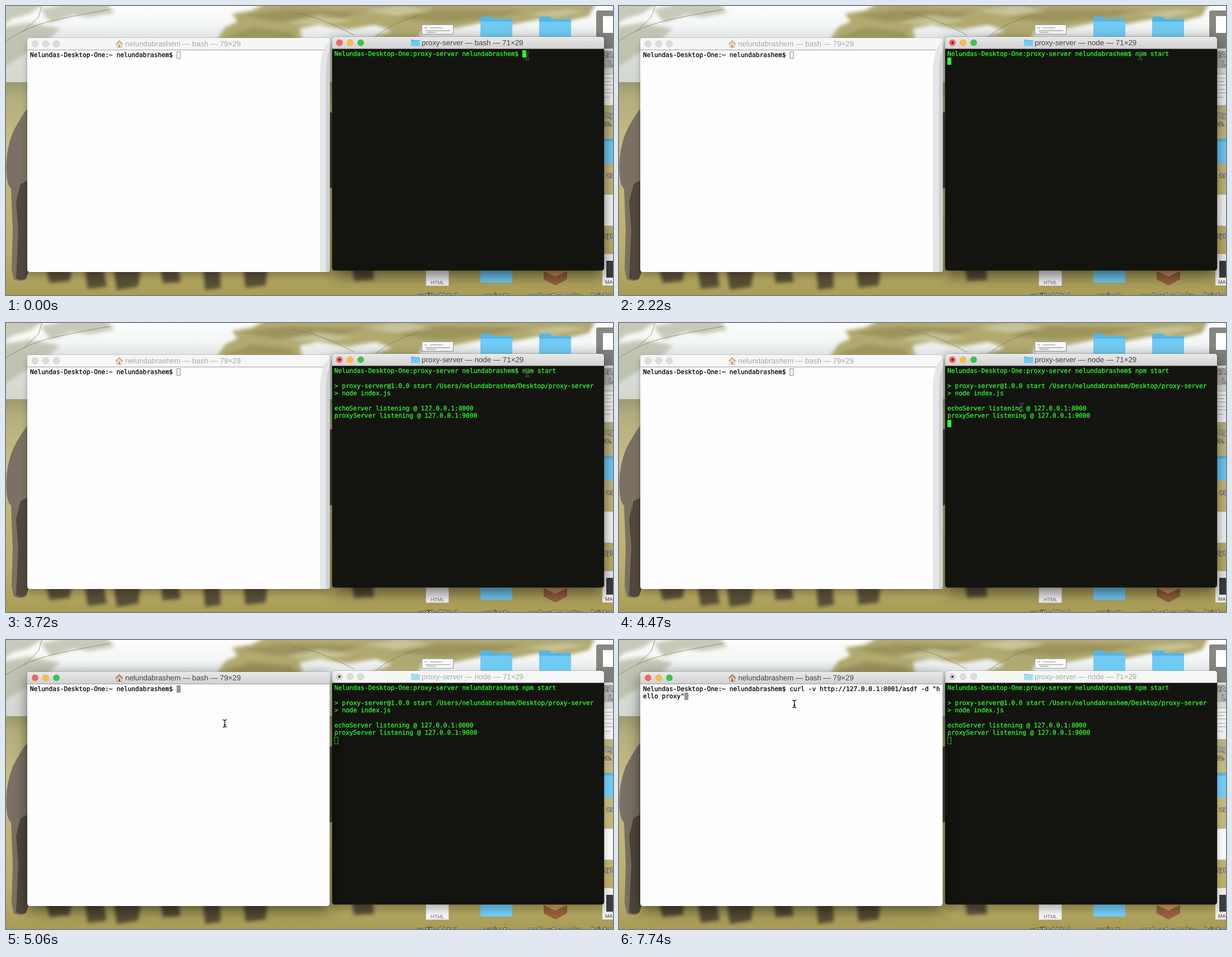
Animation of 1085 by 516 pixels, one loop 8 s. Source, as an HTML page:

```html
<!DOCTYPE html>
<html lang="en">
<head>
<meta charset="utf-8">
<title>Proxy server demo</title>
<style>
html, body { margin: 0; width: 100%; height: 100%; overflow: hidden; background: #fff; }
svg { display: block; width: 1085px; height: 516px; }
text { white-space: pre; text-rendering: geometricPrecision; }
.term text { font: 11.16px "DejaVu Sans Mono", monospace; stroke-width: .3; }
.left .term text { fill: #000; stroke: #000; }
.right .term text { fill: #2cfb2c; stroke: #2cfb2c; }
.title { font: 13.3px "Liberation Sans", sans-serif; fill: #a8a8a8; }
.active .title { fill: #454545; }
.label { font: 13px "Liberation Sans", sans-serif; fill: #fff; stroke: #0008; stroke-width: 2; paint-order: stroke; text-anchor: middle; }
.edge { text-anchor: start; font-size: 12px; }
.shadow { opacity: .22; filter: url(#near); }
.active .shadow { opacity: .52; filter: url(#far); }
.cast { display: none; }
.active .cast { display: inline; }
.bar { fill: #f6f6f6; }
.active .bar { fill: url(#barFill); }
.dot { fill: #dcdcdc; stroke: #c6c6c6; stroke-width: .7; }
.active .dot { stroke: #0002; }
.active .close { fill: #fc605b; }
.active .mini { fill: #fdbc40; }
.active .zoom { fill: #34c749; }
.icon { opacity: .6; }
.active .icon { opacity: 1; }
.left .caret { fill: none; stroke: #888; }
.left.active .caret { fill: #979797; stroke: #8a8a8a; }
.right .caret { fill: none; stroke: #24c424; }
.right.active .caret { fill: #2cfb2c; stroke: #2cfb2c; }
.hidden { display: none; }
</style>
</head>
<body>
<svg viewBox="0 0 1085 516">
  <defs>
    <linearGradient id="barFill" x2="0" y2="1">
      <stop stop-color="#e9e9e9"/><stop offset="1" stop-color="#d1d1d1"/>
    </linearGradient>
    <linearGradient id="sky" x2="0" y2="1">
      <stop stop-color="#fcfdfc"/><stop offset=".25" stop-color="#f4f6f6"/>
      <stop offset=".4" stop-color="#dfe4e4"/><stop offset="1" stop-color="#d2d6cb"/>
    </linearGradient>
    <linearGradient id="land" x2="0" y2="1">
      <stop stop-color="#9a9b70"/><stop offset=".08" stop-color="#b4ae7e"/>
      <stop offset=".3" stop-color="#c8bd82"/><stop offset=".8" stop-color="#bbae68"/>
      <stop offset="1" stop-color="#a89c56"/>
    </linearGradient>
    <filter id="near" x="-10%" y="-10%" width="120%" height="120%"><feGaussianBlur stdDeviation="6"/></filter>
    <filter id="far" x="-15%" y="-15%" width="130%" height="130%"><feGaussianBlur stdDeviation="12"/></filter>
    <filter id="soft"><feGaussianBlur stdDeviation="3"/></filter>
    <clipPath id="outsideLeft">
      <path clip-rule="evenodd" d="M0 0H1085V516H0zM38 57H578.500V475H38z"/>
    </clipPath>
    <g id="folder">
      <path fill="#55b5e5" d="M0 3q0-3 3-3h16l4 4h31q3 0 3 3v20H0z"/>
      <path fill="#70caf4" d="M0 9h57v36q0 3-3 3H3q-3 0-3-3z"/>
    </g>
    <path id="beam" fill="none" d="M-3.5-6.5q3.5 0 3.5 2v9q0 2-3.5 2M3.5-6.5q-3.5 0-3.5 2M3.5 6.5q-3.5 0-3.5-2M-2 2.5h4"/>
  </defs>

  <!-- landscape -->
  <rect width="1085" height="140" fill="url(#sky)"/>
  <g filter="url(#soft)">
    <path fill="#b0a970" d="M376 62L392 38 414 28 404 14 440 8 470-8H1056L1042 18 1000 28 950 24 900 34 850 30 800 40 745 42 735 62H640L690 44 660 34 610 42 560 34 525 40 530 62z"/>
    <path fill="#8f8850" opacity=".6" d="M420 16L500 6 640 10 590 24 480 28zM690 22L770 6 930 8 880 20 780 30zM385 58L440 38 510 46 520 60z"/>
    <path fill="#d8d6b4" opacity=".6" d="M500 30L560 16 620 26 560 34zM640 8L710-2 760 8 700 18zM930 14L1000 6 1040 10 980 20z"/>
    <path fill="#b3b59d" opacity=".7" d="M-5-5H70L42 14 12 22-5 34zM62 6L110-5 180-5 194 12 150 20 120 16 80 30zM-5 38L40 30 96 40 76 60-5 110z"/>
  </g>
  <path fill="none" stroke="#77755a" opacity=".7" d="M0 62Q40 36 84 26T186 6M30 46L58 20 64 0M512 12Q560 18 622 52M660 55Q690 30 740 16"/>
  <rect y="136" width="1085" height="380" fill="url(#land)"/>
  <path fill="#7a7164" d="M42 178Q26 198 12 226Q-2 262 1 300Q2 320 9 326L12 400 10 470 14 488Q26 494 36 488L42 470z"/>
  <path fill="#50483b" d="M42 310L26 318 18 350 22 400 18 486Q28 492 36 486L42 470z"/>
  <path fill="#574e35" filter="url(#soft)" d="M70 465h48l-4 26-36 4zM140 465h34l6 36-34 4zM192 465h50l-6 36-38 6zM276 465h32l4 28-32 2zM352 465h30l2 38-28 4zM424 465h44l-4 34-36 4zM618 465h38l2 24-36 2z"/>
  <path fill="#4e4734" d="M570 190h18v132l-18 8z"/>

  <!-- desktop items -->
  <rect x="743.5" y="33.5" width="56" height="17" fill="#fafafa" stroke="#9a9a9a"/>
  <path stroke="#888" d="M748 39h5M758 39h22M750 44h44M752 47h16"/>
  <use href="#folder" x="848" y="19"/>
  <use href="#folder" x="953" y="19"/>
  <use href="#folder" x="848" y="446"/>
  <use href="#folder" x="1045" y="233"/>
  <rect x="1055" y="8" width="40" height="68" rx="3" fill="#4c4a42" opacity=".65"/>
  <rect x="1067" y="18" width="30" height="30" fill="#fff"/>
  <rect x="1066" y="80" width="30" height="31" fill="#b5b4ac"/>
  <rect x="1062" y="121.5" width="40" height="56" fill="#f0f0ee" stroke="#aaa"/>
  <path stroke="#999" d="M1070 129h15M1070 135h12M1070 141h15M1070 149h13M1070 155h15M1070 163h10"/>
  <rect x="1062" y="336.5" width="40" height="56" fill="#f7f7f6" stroke="#bbb"/>
  <rect x="1066" y="443" width="40" height="56" fill="#ececea"/>
  <rect x="1073" y="455" width="30" height="30" fill="#3c3c3c"/>
  <text x="1071" y="496" font-family="Liberation Sans, sans-serif" font-size="9" fill="#444">MA</text>
  <rect x="750.5" y="446" width="41" height="53.5" fill="#f3f3f3" stroke="#bbb"/>
  <text x="759" y="496.5" font-family="Liberation Sans, sans-serif" font-size="9" fill="#777">HTML</text>
  <path fill="#94613a" d="M961 473l21 10 21-10v15l-21 11-21-11z"/>
  <path fill="#c8945f" d="M961 473l21-9 21 9-21 10z"/>
  <g class="label">
    <text x="771" y="522">untitled.html</text>
    <text x="877" y="522">projects</text>
    <text x="981" y="522">node-v4.6.0.pkg</text>
    <text x="1070" y="522">brief.md</text>
    <g class="edge">
      <text x="1067" y="91">CA</text><text x="1078" y="107">L</text>
      <text x="1069" y="199">Og</text><text x="1067" y="214">cc.</text>
      <text x="1073" y="306">as</text><text x="1069" y="414">syr</text>
    </g>
  </g>

  <g id="windows">
    <g id="left" class="left">
      <rect class="shadow" x="38" y="65" width="541" height="418" rx="5"/>
      <rect x="37.5" y="56.5" width="541.5" height="419" rx="5" fill="#0003"/>
      <rect x="38" y="57" width="540.5" height="418" rx="4.5" fill="#fefefe"/>
      <path class="bar" d="M38 78V61.5q0-4.5 4.5-4.5h531.5q4.5 0 4.5 4.5V78z"/>
      <path stroke="#9b9b9b" d="M38 78.5h540.5"/>
      <circle class="dot close" cx="52" cy="67.5" r="5.7"/>
      <circle class="dot mini" cx="71" cy="67.5" r="5.7"/>
      <circle class="dot zoom" cx="90" cy="67.5" r="5.7"/>
      <g class="icon">
        <path fill="#e8d9c2" stroke="#9c7b5c" stroke-width=".8" d="M198 67h9v7h-9z"/>
        <path fill="#b0703f" d="M195.5 68l7-7 7 7-1.5 1-5.5-5-5.5 5z"/>
        <path fill="#8a5a38" d="M201 69.5h3v4.5h-3z"/>
      </g>
      <text class="title" x="213" y="72">nelundabrashem — bash — 79×29</text>
      <g class="term"></g>
    </g>
    <g id="right" class="right">
      <g clip-path="url(#outsideLeft)">
        <rect class="shadow" x="583" y="64" width="486" height="418" rx="5"/>
      </g>
      <g class="cast">
        <path fill="#e4e6e7" d="M578.5 62Q561 78 561 120V475h13.5q4 0 4-4z"/>
        <path fill="#cdd0d2" d="M578.5 78Q572 92 572 122V475h2.5q4 0 4-4z"/>
      </g>
      <rect x="582.5" y="54.5" width="487" height="418.5" rx="5" fill="#0005"/>
      <rect x="583" y="55" width="486" height="417" rx="4.5" fill="#13140f"/>
      <path class="bar" d="M583 76.5V59.5q0-4.5 4.5-4.5h477q4.5 0 4.5 4.5v17z"/>
      <circle class="dot close" cx="596" cy="65.5" r="5.7"/>
      <circle class="dot mini" cx="615" cy="65.5" r="5.7"/>
      <circle class="dot zoom" cx="634" cy="65.5" r="5.7"/>
      <circle id="busy" cx="596" cy="65.5" r="2" fill="#3b1f1d"/>
      <use class="icon" href="#folder" transform="translate(724 60) scale(.28 .24)"/>
      <text id="rightTitle" class="title" x="743" y="70"></text>
      <g class="term"></g>
    </g>
  </g>
  <g id="mouse">
    <use href="#beam" stroke="#fff" stroke-opacity=".45" stroke-width="2.6"/>
    <use href="#beam" stroke="#111" stroke-width="1.3"/>
  </g>
</svg>
<script>
const LOOP = 8000, CELL = 6.72, ROW = 13.4;
const user = "nelundabrashem", host = "Nelundas-Desktop-One";
const $ = id => document.getElementById(id);

// Latest value in [time, value, time, value, ...] reached at t.
function at(t, steps) {
  let value;
  for (let i = 0; i < steps.length && steps[i] <= t; i += 2) value = steps[i + 1];
  return value;
}

function terminal(win, x, top) {
  const term = win.querySelector(".term");
  let last;
  return (lines, showCaret) => {
    const key = lines.join("\n") + showCaret;
    if (key === last) return;
    last = key;
    const row = lines.length - 1;
    term.innerHTML = lines.map((line, i) =>
      `<text x="${x}" y="${top + 10 + i * ROW}">${line}</text>`).join("") +
      (showCaret ? `<rect class="caret" x="${x + lines[row].length * CELL + .5}"
        y="${Math.round(top + row * ROW) + .5}" width="6" height="12"/>` : "");
  };
}

const drawLeft = terminal($("left"), 43, 81);
const drawRight = terminal($("right"), 587, 79);

const typing = [440, 740, 890, 1040, 1190, 1340, 1480, 1630, 1780];
const banner = ["", `> proxy-server@1.0.0 start /Users/${user}/Desktop/proxy-server`,
  "> node index.js", ""];
const ready = ["echoServer listening @ 127.0.0.1:8000",
  "proxyServer listening @ 127.0.0.1:9000", ""];
const curl = 'curl -v http://127.0.0.1:8001/asdf -d "hello proxy"';

const caretOn = [0, true, 150, false, 440, true, 3720, false, 4320, true, 4910, false, 5060, true];
const mousePath = [0, [932, 89], 4170, [928, 92], 4320, [890, 110], 4470, [720, 150],
  4620, [559, 170], 4760, [400, 160], 4910, [391, 149], 5210, [379, 141],
  5360, [354, 130], 5510, [326, 118], 5650, [313.5, 114]];

function rightLines(t) {
  const count = typing.filter(time => time <= t).length;
  const command = "npm start".slice(0, count) + (count === typing.length ? " " : "");
  const lines = [`${host}:proxy-server ${user}$ ${command}`];
  if (t >= 2670) lines.push(...banner);
  if (t >= 2970) lines.push(...ready);
  else if (t >= 2070) lines.push("");
  return lines;
}

function leftLines(t) {
  const length = at(t, [0, 0, 6850, 6, 7590, 44, 7740, curl.length]);
  const text = `${host}:~ ${user}$ ${curl.slice(0, length)}`;
  return text.length > 79 ? [text.slice(0, 79), text.slice(79)] : [text];
}

function focus(id) {
  const win = $(id);
  if (win.classList.contains("active")) return;
  $("left").classList.toggle("active", id === "left");
  $("right").classList.toggle("active", id === "right");
  $("windows").append(win);
}

function draw(now) {
  const t = now % LOOP, running = t >= 2220;
  focus(t < 5060 ? "right" : "left");
  $("busy").classList.toggle("hidden", !running);
  $("rightTitle").textContent = `proxy-server — ${running ? "node" : "bash"} — 71×29`;
  drawLeft(leftLines(t), true);
  drawRight(rightLines(t), at(t, caretOn));
  $("mouse").setAttribute("transform", `translate(${at(t, mousePath)})`);
  requestAnimationFrame(draw);
}
draw(0);
</script>
</body>
</html>
```
